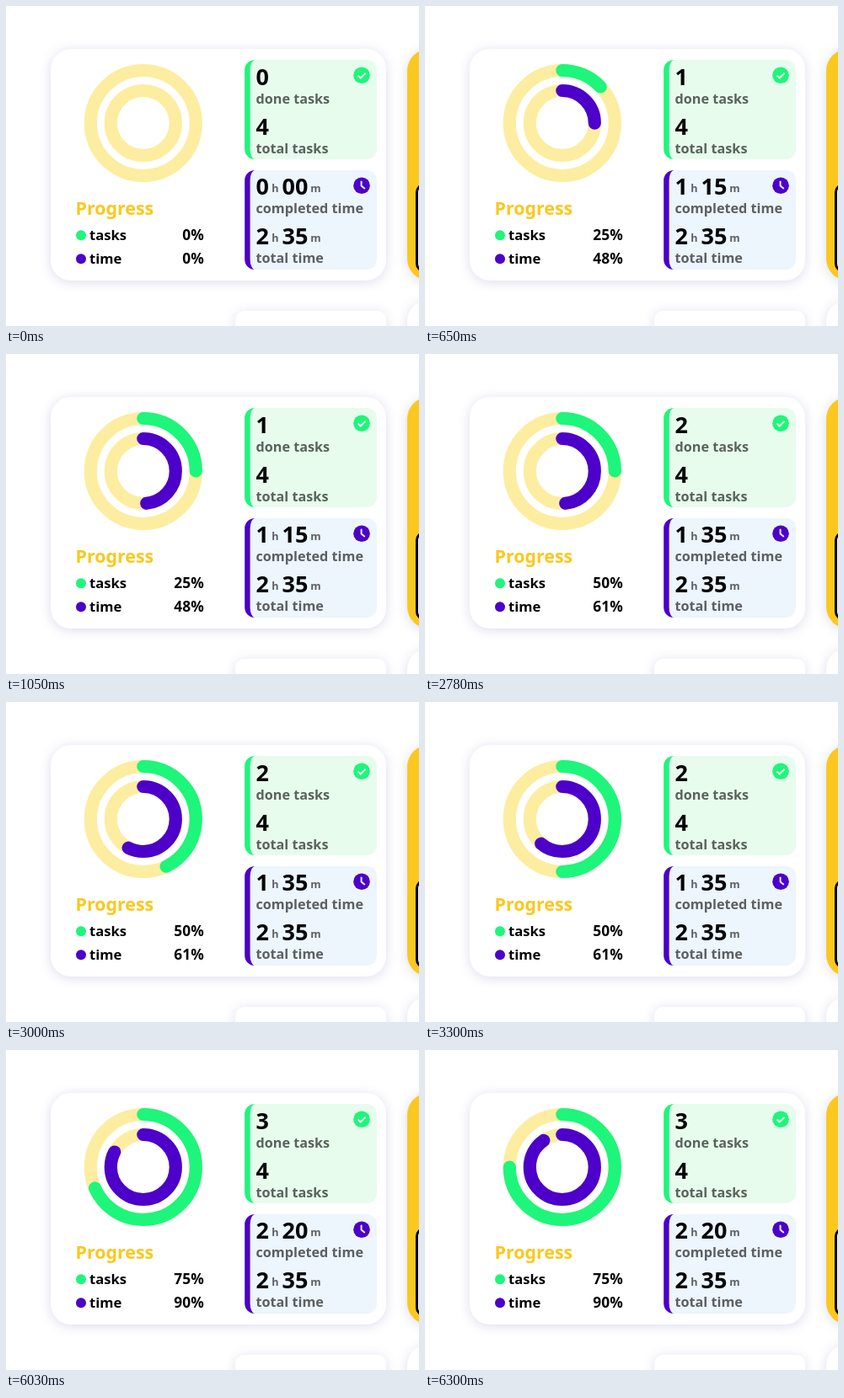
Write an HTML page with a canvas that moves like this. It is 490x380 px and loops after 8 s.

```html
<!DOCTYPE html>
<html lang="en">
<head>
<meta charset="utf-8">
<title>Progress card</title>
<style>
html, body { margin: 0; width: 100%; height: 100%; overflow: hidden; background: #fff; }
canvas { display: block; }
</style>
</head>
<body>
<canvas id="stage" width="490" height="380"></canvas>
<script>
const ctx = document.getElementById('stage').getContext('2d');
const GREEN = '#1df67a', PURPLE = '#4c00c9', YELLOW = '#fac81e', TRACK = '#fdeda0';
const INK = '#050507', GREY = 'rgba(0,0,0,.61)';
const LOOP = 8000, DURATION = 500, TOTAL = 155;
const steps = [
  { at: -DURATION, done: 0, minutes: 0 },
  { at: 500, done: 1, minutes: 75 },
  { at: 2780, lag: 10, done: 2, minutes: 95 },
  { at: 5830, lag: -20, done: 3, minutes: 140 }
];

// cubic-bezier(.25, .1, .25, 1)
function ease(x) {
  if (x <= 0) return 0;
  if (x >= 1) return 1;
  const bez = (a, b, u) => 3 * a * u * (1 - u) ** 2 + 3 * b * u * u * (1 - u) + u ** 3;
  let lo = 0, hi = 1;
  for (let i = 0; i < 24; i++) {
    const mid = (lo + hi) / 2;
    if (bez(.25, .25, mid) < x) lo = mid; else hi = mid;
  }
  return bez(.1, 1, lo);
}

function text(str, x, y, size, color, align = 'left') {
  ctx.font = `700 ${size}px "Noto Sans", "Open Sans", sans-serif`;
  ctx.textAlign = align;
  ctx.fillStyle = color;
  ctx.fillText(str, x, y);
}

const number = (str, x, y) => text(str, x, y, 27, INK);
const label = (str, y) => text(str, 296.5, y, 16.2, GREY);

function box(x, y, w, h, r, fill, shadow) {
  ctx.save();
  if (shadow) {
    ctx.shadowColor = 'rgba(70,60,150,.18)';
    ctx.shadowBlur = 14;
    ctx.shadowOffsetY = 2;
  }
  ctx.beginPath();
  ctx.roundRect(x, y, w, h, r);
  ctx.fillStyle = fill;
  ctx.fill();
  ctx.restore();
}

function disc(x, y, r, color) {
  ctx.beginPath();
  ctx.arc(x, y, r, 0, 2 * Math.PI);
  ctx.fillStyle = color;
  ctx.fill();
}

function line(points, color, width) {
  ctx.beginPath();
  points.forEach(([x, y]) => ctx.lineTo(x, y));
  ctx.strokeStyle = color;
  ctx.lineWidth = width;
  ctx.lineCap = 'butt';
  ctx.lineJoin = 'miter';
  ctx.stroke();
}

function panel(y, fill, edge) {
  const x = 283.2, w = 156.8, h = 118, border = 6.4;
  const inner = { x: 6, y: 12 };
  box(x, y, w, h, 12, fill);
  ctx.beginPath();
  ctx.roundRect(x, y, w, h, 12);
  ctx.roundRect(x + border, y, w - border, h, [inner, 12, 12, inner]);
  ctx.fillStyle = edge;
  ctx.fill('evenodd');
}

function ring(r, share, color) {
  const arc = (part, stroke) => {
    ctx.beginPath();
    ctx.arc(162.8, 139, r, -Math.PI / 2, (2 * part - .5) * Math.PI);
    ctx.strokeStyle = stroke;
    ctx.stroke();
  };
  ctx.lineWidth = 15.2;
  ctx.lineCap = 'round';
  arc(1, TRACK);
  if (share > 0) arc(share, color);
}

function clockText(minutes, y) {
  number(Math.floor(minutes / 60), 296.5, y);
  text('h', 315.2, y - 3.2, 12.6, GREY);
  number(String(minutes % 60).padStart(2, '0'), 327.5, y);
  text('m', 361.2, y - 3.2, 12.6, GREY);
}

function legend(name, share, y, color) {
  disc(89, y - 5.7, 6, color);
  text(name, 99, y, 16.6, INK);
  text(Math.round(share * 100) + '%', 234.7, y, 17.3, INK, 'right');
}

function surroundings() {
  box(476, 51, 398, 275, 26, YELLOW, true);
  box(486, 211, 120, 105, 10, '#000');
  box(489, 214, 114, 99, 7, '#fff');
  box(272, 362, 179, 80, 10, '#fff', true);
  box(476, 350, 398, 120, 24, '#fff', true);
  box(53, 51, 398, 275, 24, '#fff', true);
}

function draw(t) {
  let i = steps.length - 1;
  while (i > 0 && t < steps[i].at) i--;
  const now = steps[i], last = steps[Math.max(0, i - 1)];
  const p = ease((t - now.at - (now.lag || 0)) / DURATION);
  const mix = key => last[key] + (now[key] - last[key]) * p;

  ctx.fillStyle = '#fff';
  ctx.fillRect(0, 0, 490, 380);
  surroundings();

  ring(62.5, mix('done') / 4, GREEN);
  ring(38.5, mix('minutes') / TOTAL, PURPLE);
  text('Progress', 82.5, 248, 21.4, YELLOW);
  legend('tasks', now.done / 4, 278, GREEN);
  legend('time', now.minutes / TOTAL, 306, PURPLE);

  panel(64, '#e7fced', GREEN);
  number(now.done, 296.5, 93.5);
  label('done tasks', 116);
  number(4, 296.5, 152.5);
  label('total tasks', 175);
  disc(422, 82.3, 9.8, GREEN);
  line([[417.5, 82.5], [420.7, 85.6], [426.6, 79.7]], '#e7fced', 2.1);

  panel(195, '#edf5fd', PURPLE);
  clockText(now.minutes, 224);
  label('completed time', 246);
  clockText(TOTAL, 283);
  label('total time', 305);
  disc(422, 213.3, 9.8, PURPLE);
  line([[421.6, 207.8], [421.6, 213.5], [425.8, 217]], '#edf5fd', 1.9);
}

const start = performance.now();
function frame() {
  draw((performance.now() - start) % LOOP);
  requestAnimationFrame(frame);
}
frame();
</script>
</body>
</html>
```
